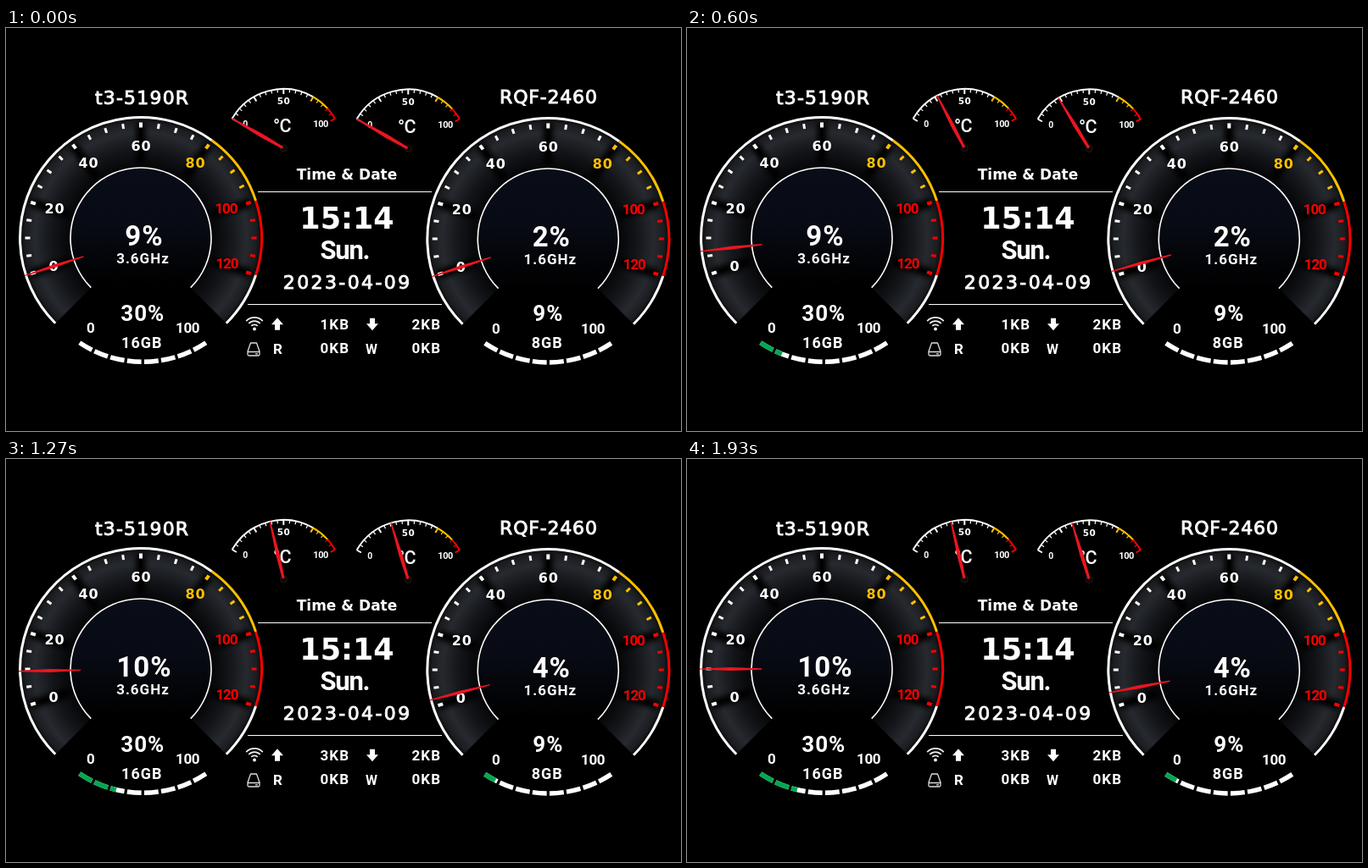
An HTML page that plays this animation: 796 by 476 pixels, repeating every 1.99 s.

```html
<!DOCTYPE html>
<html lang="en">
<head>
<meta charset="utf-8">
<title>System monitor</title>
<style>
  html, body { margin: 0; width: 100%; height: 100%; overflow: hidden; background: #000; }
  svg { display: block; width: 796px; height: 476px; }
  text { fill: #fff; font-family: Roboto, sans-serif; font-weight: 700; text-anchor: middle; }
  .wide { font-family: "DejaVu Sans", sans-serif; }
  .mid { font-weight: 500; }
  .thin { font-weight: 400; stroke: #fff; stroke-width: .9; }
  .end { text-anchor: end; }
</style>
</head>
<body>
<svg id="stage" viewBox="0 0 796 476">
  <defs>
    <radialGradient id="ring" gradientUnits="userSpaceOnUse" cx="0" cy="0" r="142">
      <stop offset=".58" stop-color="#050507"/>
      <stop offset=".74" stop-color="#131519"/>
      <stop offset=".88" stop-color="#26292e"/>
      <stop offset=".96" stop-color="#1b1d20"/>
      <stop offset="1" stop-color="#0b0b0d"/>
    </radialGradient>
    <linearGradient id="face" x1="0" y1="0" x2="0" y2="1">
      <stop offset="0" stop-color="#090d18"/>
      <stop offset=".4" stop-color="#080b14"/>
      <stop offset=".85" stop-color="#000"/>
    </linearGradient>
    <filter id="soft" x="-20%" y="-20%" width="140%" height="140%"><feGaussianBlur stdDeviation="3"/></filter>
  </defs>
</svg>
<script>
const WHITE = '#fff', AMBER = '#ffc000', RED = '#f00', GREEN = '#00a850', NEEDLE = '#eb1520';
const stage = document.getElementById('stage');
const LOOP = 1990, STEP = 200 / 3;

// Angles are in degrees, clockwise from straight up.
const polar = (r, a) => {
  const t = a * Math.PI / 180;
  return [(r * Math.sin(t)).toFixed(2), (-r * Math.cos(t)).toFixed(2)];
};
const arcPath = (r, a, b) =>
  `M${polar(r, a)}A${r} ${r} 0 ${b - a > 180 ? 1 : 0} 1 ${polar(r, b)}`;
const arc = (r, a, b, color, w) =>
  `<path d="${arcPath(r, a, b)}" fill="none" stroke="${color}" stroke-width="${w}"/>`;
const spoke = (r1, r2, a, color, w) =>
  `<path d="M${polar(r1, a)}L${polar(r2, a)}" stroke="${color}" stroke-width="${w}"/>`;
const text = (s, x, y, size, gap = 0, cls = '', extra = '') =>
  `<text x="${x + gap / 2}" y="${y}" font-size="${size}" letter-spacing="${gap}" class="${cls}" ${extra}>${s}</text>`;
const group = (x, y, body) => `<g transform="translate(${x} ${y})">${body}</g>`;
const zone = (v, warn, hot) => v >= hot ? RED : v >= warn ? AMBER : WHITE;

function dial(x, y, id, clock) {
  const scale = v => v * 1.8 - 108;
  let s = `<path d="${arcPath(141, -135, 135)}L${polar(83, 135)}A83 83 0 1 0 ${polar(83, -135)}Z" fill="url(#ring)"/>`;
  s += '<circle r="82" fill="url(#face)"/><g filter="url(#soft)">';
  for (let v = 0; v <= 120; v += 20) s += spoke(88, 137, scale(v), '#000', 11);
  s += '</g>' + arc(83, -135, 135, WHITE, 1.6);
  s += arc(142.5, -135, 36, WHITE, 3) + arc(142.5, 36, 72, AMBER, 3)
     + arc(142.5, 72, 108, RED, 3) + arc(142.5, 108, 135, WHITE, 3);
  for (let v = 0; v <= 120; v += 5) {
    const major = v % 20 === 0;
    if (major) s += spoke(106, 130, scale(v), '#000', 2);
    s += spoke(130.5, 136.5, scale(v), zone(v, 80, 100), major ? 4 : 3);
  }
  const spots = [[-103, 39], [-102, -29], [-62, -83], [0, -103], [64, -83], [101, -29], [102, 36]];
  spots.forEach(([px, py], i) => {
    const v = i * 20, fill = `style="fill:${zone(v, 80, 100)}"`;
    s += v < 100 ? text(v, px, py, 16, .8, 'wide', fill) : text(v, px, py, 17, -1.2, '', fill);
  });
  s += text('', 3.5, 9, 33, 1, '', `id="${id}Load"`) + text(clock, 2, 30, 17, 1);
  s += `<path id="${id}Needle" d="M-.6-144L.6-144L2-108L.7-71L-.7-71L-2-108Z" fill="${NEEDLE}"/>`;
  return group(x, y, s);
}

function thermo(x, y, id) {
  let s = arc(70, -60, 30, WHITE, 2) + arc(70, 30, 48, AMBER, 2) + arc(70, 48, 60, RED, 2);
  for (let a = -60; a <= 60; a += 6) {
    const big = a % 30 === 0;
    s += spoke(big ? 64 : 66, 70, a, zone(a, 30, 48), big ? 2 : 1.2);
  }
  s += text('50', 0, -52, 10.5, .3, 'wide') + text('0', -45, -25, 10.5) + text('100', 44, -25, 11, -.4);
  s += text('°C', -1.5, -19, 21.5, -.6, 'mid');
  s += '<circle r="4" fill="#080406" stroke="#2a1518"/>';
  s += `<path id="${id}Needle" d="M-.8-70L.8-70L2.2-30L1.5-1L-1.5-1L-2.2-30Z" fill="${NEEDLE}"/>`;
  return group(x, y, s);
}

// Segmented memory bar along a shallow arc.
const BAR = { r: 134.6, from: 213.6, span: 67.2, count: 8, gap: 1.4 };
function barPath(p) {
  const pitch = (BAR.span + BAR.gap) / BAR.count, end = BAR.from - BAR.span * p;
  let d = '';
  for (let i = 0; i < BAR.count; i++) {
    const a = BAR.from - i * pitch, b = Math.max(a - pitch + BAR.gap, end);
    if (b < a) d += arcPath(BAR.r, b, a);
  }
  return d;
}
function memory(x, y, id, used, total) {
  const line = (extra, color) => `<path ${extra} fill="none" stroke="${color}" stroke-width="5.5"/>`;
  return group(x, y,
    line(`d="${barPath(1)}"`, WHITE) + line(`id="${id}Bar"`, GREEN) +
    text(used, -.5, 86, 26, 1) + text(total, -1.5, 118, 18, 1) +
    text('0', -61.5, 100.5, 17) + text('100', 53, 100.5, 17, -.4));
}

const rule = (x1, x2, y) => `<path d="M${x1} ${y}H${x2}" stroke="#fff"/>`;
const arrow = (x, y, turn) =>
  `<path transform="translate(${x} ${y}) rotate(${turn})" d="M0-7.5L7 .5H3V7H-3V.5H-7Z" fill="#fff"/>`;
const wifi = group(293, 355.5,
  '<circle r="2" fill="#eee"/>' + [5.2, 9.4, 13.6].map(r => arc(r, -46, 46, '#eee', 1.7)).join(''));
const drive = '<path d="M288.5 372H295.5L299 382V385.5Q299 387 297.5 387H286.5Q285 387 285 385.5V382ZM285.5 382.5H298.5M294 384.8H297" fill="none" stroke="#ddd" stroke-width="1.3" stroke-linejoin="round"/>';

stage.insertAdjacentHTML('beforeend', [
  text('t3-5190R', 160, 89.5, 22, 1.2, 'wide thin'),
  text('RQF-2460', 639.5, 88.5, 22, .8, 'wide thin'),
  dial(159, 248, 'cpu', '3.6GHz'), dial(639.3, 249, 'gpu', '1.6GHz'),
  memory(161.3, 259.7, 'ram', '30%', '16GB'), memory(639.3, 260.3, 'vram', '9%', '8GB'),
  thermo(327.3, 142, 'cpuTemp'), thermo(474.3, 142.5, 'gpuTemp'),
  text('Time &amp; Date', 402, 179, 17, 0, 'wide'),
  rule(297, 502, 193.5),
  text('15:14', 402, 237, 35, 0, 'wide'),
  text('Sun.', 400, 273, 31, -1.2),
  text('2023-04-09', 401.5, 308, 22, 2.4, 'wide thin'),
  rule(285, 514, 326.5),
  wifi, drive, arrow(320, 349.7, 0), arrow(432, 349.7, 180),
  text('', 404.5, 356, 17, 1, 'end', 'id="up"'), text('2KB', 512.5, 356, 17, 1, 'end'),
  text('R', 320.5, 384.5, 17), text('W', 431, 384.5, 16),
  text('0KB', 404.5, 384, 17, 1, 'end'), text('0KB', 512.5, 384, 17, 1, 'end')
].join(''));

const el = id => document.getElementById(id);
const turn = (id, a) => el(id + 'Needle').setAttribute('transform', `rotate(${a})`);
const clamp = (v, hi) => Math.max(0, Math.min(v, hi));
const label = (id, s) => { if (el(id).textContent !== s) el(id).textContent = s; };

// Needles sweep up during 13 steps, rest, then drift to the new reading after step 19.
function load(k, first, last) {
  const v = first * clamp(k / 13, 1) + (last - first) * clamp((k - 19) / 10, 1);
  return v * 1.8 - 108;
}

let shown = -1;
function draw() {
  const t = performance.now() % LOOP;
  const k = Math.floor((Math.floor(t / 10) * 10 + 4) / STEP);
  if (k !== shown) {
    shown = k;
    const fresh = k >= 16;
    turn('cpu', load(k, 9.4, 10));
    turn('gpu', load(k, 2, 4));
    turn('cpuTemp', clamp(3 * k, 39) * 1.2 - 60);
    turn('gpuTemp', clamp(3 * (k - 1), 36) * 1.2 - 60);
    el('ramBar').setAttribute('d', barPath(clamp(3 * (k - 3), 30) / 100));
    el('vramBar').setAttribute('d', barPath(clamp(3 * (k - 10), 9) / 100));
    label('cpuLoad', fresh ? '10%' : '9%');
    label('gpuLoad', fresh ? '4%' : '2%');
    label('up', fresh ? '3KB' : '1KB');
  }
  requestAnimationFrame(draw);
}
draw();
</script>
</body>
</html>
```
